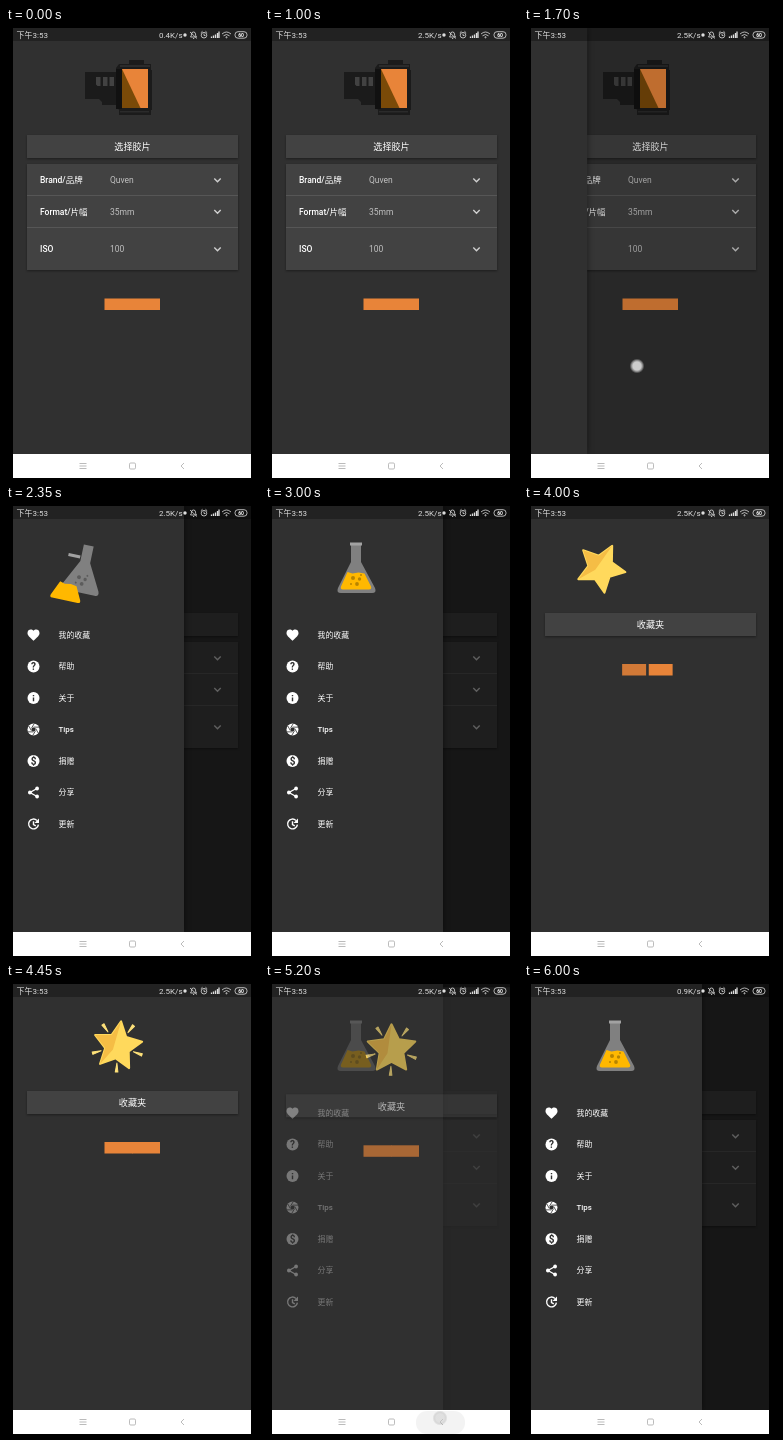
An HTML page for the animation above (6050 ms loop, 253 by 450 pixels).

```html
<!DOCTYPE html>
<html lang="zh">
<head>
<meta charset="utf-8">
<style>
html, body { margin: 0; height: 100%; overflow: hidden; background: #000; }
svg { display: block; width: 253px; height: 450px; }
text { font: 8.5px Roboto, "Noto Sans CJK SC", "Noto Sans CJK", sans-serif; fill: #fff; }
.title { font-size: 9.1px; text-anchor: middle; }
.label { font-weight: 500; }
.value { fill: #c1c1c1; }
.item { font-size: 7.9px; font-weight: 500; }
.status { font-size: 8px; fill: #ddd; }
.sign { font-size: 10px; font-weight: 700; text-anchor: middle; fill: #303030; }
.line { fill: none; stroke: #fff; stroke-width: 1.4; }
.thin { fill: none; stroke: #ddd; stroke-width: .8; }
.nav { fill: none; stroke: #aaa; stroke-width: .8; }
.card { fill: #424242; filter: drop-shadow(0 1px 1px #0006); }
#drawer { filter: drop-shadow(0 0 3px #0008); }
</style>
</head>
<body>
<svg viewBox="0 0 253 450">
  <defs>
    <clipPath id="itemClip"><path d="M11 113h163v32H11z"/></clipPath>
    <radialGradient id="dot">
      <stop offset=".55" stop-color="#ccc"/><stop offset=".75" stop-color="#aaa" stop-opacity=".75"/>
      <stop offset="1" stop-color="#888" stop-opacity="0"/>
    </radialGradient>
  </defs>

  <g id="home">
    <path fill="#303030" d="M7 0h238v426H7z"/>
    <g id="camera">
      <path fill="#1b1b1b" d="M79 44h31v-4l3-4h10v-4h15v4h7v6h1v40h-1v5h-32v-5l-3-5h-14v-3l-3-3H79z"/>
      <path fill="#111" d="M110 41h6v40h-6z"/>
      <path fill="#424242" d="M90 49h4.5v9H91.500l-1.500-1.500zM97 49h4.500v9H97zM103.500 49h4.500v9h-4.500z"/>
      <path fill="#e88439" d="M116 41h26v39h-26z"/>
      <path fill="#7a4a08" d="M116 41l18.500 39H116z"/>
      <path fill="#2b2b2b" d="M114 37h30v2h-30zM114 83h29v1.500h-29z"/>
    </g>
    <path class="card" d="M21 107h211v23H21z"/>
    <text class="title" x="126.500" y="122.300">选择胶片</text>
    <path class="card" d="M21 136h211v106H21z"/>
    <path stroke="#5c5c5c" stroke-width=".8" d="M21 167.500h211M21 199.500h211"/>
    <g id="rows"></g>
    <path fill="#e88439" d="M98.500 270.500h55.500v11.500H98.500z"/>
  </g>

  <path id="scrim" d="M7 0h238v426H7z"/>

  <g id="drawer">
    <path fill="#303030" d="M7 0h171v426H7z"/>
    <g id="flask">
      <path fill="#808080" d="M86 39h10v17l14 26q2 5-3 5H76q-5 0-3-5l13-26z"/>
      <g id="liquid">
        <path fill="#ffb800" d="M82.500 66l5 1.500 6-1 6 1 6.500 13q1 3-2 3H78q-3 0-2-3z"/>
      </g>
      <g fill="#000" opacity=".28">
        <circle cx="88" cy="72" r="2"/><circle cx="94.500" cy="73" r="1.700"/>
        <circle cx="92" cy="78" r="1.900"/><circle cx="86" cy="78" r="1"/><circle cx="96" cy="69" r="1"/>
      </g>
      <path id="rim" fill="#a2a2a2" d="M85 36.500h12v3H85z"/>
    </g>
    <g clip-path="url(#itemClip)"><circle id="ripple" cx="121" cy="131" fill="#fff"/></g>
    <g id="items"></g>
  </g>

  <g id="favorites">
    <path fill="#303030" d="M7 0h238v440H7z"/>
    <path class="card" d="M21 107h211v23H21z"/>
    <text class="title" x="126.500" y="122.300">收藏夹</text>
    <path id="barA" fill="#e88439"/>
    <path id="barB" fill="#e88439"/>
    <g id="star"><g id="rays"></g><g id="body"></g></g>
  </g>

  <path fill="#000" opacity=".3" d="M7 0h238v13H7z"/>
  <text class="status" x="10.500" y="10">下午3:53</text>
  <text class="status" id="speed" x="153" y="10"></text>
  <circle cx="179" cy="7" r="1.700" fill="#ddd"/>
  <g class="thin">
    <path d="M184.500 9h6q-1-1-1-3t-2-2-2 2-1 3M187 10.500h1.200M184 4l7 6.500"/>
    <circle cx="198" cy="7.200" r="2.800"/><path d="M198 5.500v2h1.500M194.800 4.800l1.700-1.500M201.200 4.800l-1.700-1.500"/>
    <path d="M205.500 10v-1.500M207.500 10v-2.500M209.500 10V6.500M211.500 10V5M213 10V3.500" stroke-width="1.300"/>
    <path d="M216 6q4.500-4 9 0M217.500 7.800q3-2.600 6 0"/><circle cx="220.500" cy="9.300" r=".6"/>
    <rect x="229" y="3.700" width="12" height="6.500" rx="3"/>
  </g>
  <text x="235" y="8.800" style="font-size:5px;font-weight:700;text-anchor:middle">60</text>

  <path fill="#fff" d="M7 426h238v24H7z"/>
  <rect id="navRipple" x="151" y="427" width="49" height="23" rx="11" fill="#ddd"/>
  <path class="nav" d="M73.500 435.500h7M73.500 438h7M73.500 440.500h7M178 435l-3 3 3 3"/>
  <rect class="nav" x="123.500" y="435" width="6" height="6" rx="1.200"/>
  <circle id="touch" r="7.500" fill="url(#dot)"/>
  <path fill="#000" d="M0 0h7v450H0zM245 0h8v450h-8z"/>
</svg>
<script>
const LOOP = 6050, STEP = 50;
const el = id => document.getElementById(id);
const set = (id, attrs) => { for (const k in attrs) el(id).setAttribute(k, attrs[k]); };
const ramp = (t, from, to) => Math.min(1, Math.max(0, (t - from) / (to - from)));
const mix = (a, b, p) => a + (b - a) * p;
const polar = (deg, r) => {
  const a = deg * Math.PI / 180;
  return [r * Math.sin(a), -r * Math.cos(a)].map(v => v.toFixed(2)).join(' ');
};

// Cubic Bezier (.4, 0, .2, 1)
function fastOutSlowIn(x) {
  let lo = 0, hi = 1;
  for (let i = 0; i < 16; i++) {
    const s = (lo + hi) / 2, r = 1 - s;
    if (1.2 * r * r * s + .6 * r * s * s + s * s * s < x) lo = s; else hi = s;
  }
  return 3 * (1 - lo) * lo * lo + lo ** 3;
}

el('rows').innerHTML = [
  ['Brand/品牌', 'Quven', 152], ['Format/片幅', '35mm', 183.5], ['ISO', '100', 221]
].map(([label, value, y]) => `
  <text class="label" x="34" y="${y + 3}">${label}</text>
  <text class="value" x="104" y="${y + 3}">${value}</text>
  <path class="line" opacity=".75" d="M208.300 ${y - 1.5}l3.200 3.200 3.200-3.200"/>`).join('');

// Icons are centred on 0,0
const disc = '<circle r="6" fill="#fff"/>';
const sign = c => `${disc}<text class="sign" y="3.600">${c}</text>`;
const blades = [0, 60, 120, 180, 240, 300].map(a =>
  `M${polar(a, 2.4)}L${polar(a + 68, 6.2)}`).join('');
const icons = [
  ['我的收藏', '<path fill="#fff" d="M0 5.700C-4 2-6 .4-6-2.100-6-5.800-1.800-6.500 0-4.200 1.800-6.500 6-5.800 6-2.100 6 .4 4 2 0 5.700z"/>'],
  ['帮助', sign('?')],
  ['关于', disc + '<path fill="#303030" d="M-.7-3h1.400v1.300H-.7zM-.7-.6h1.400v3.800H-.7z"/>'],
  ['Tips', `${disc}<circle r="2" fill="#303030"/><path stroke="#303030" stroke-width=".8" d="${blades}"/>`],
  ['捐赠', sign('$')],
  ['分享', '<path class="line" stroke-width="1.200" d="M3.600-4L-3.600 0 3.600 4"/><g fill="#fff"><circle cx="3.600" cy="-4" r="1.900"/><circle cx="-3.600" r="1.900"/><circle cx="3.600" cy="4" r="1.900"/></g>'],
  ['更新', '<path class="line" d="M3.400-3.600A4.900 4.900 0 1 0 4.900.6M0-2.800V.5L2.300 1.900"/><path fill="#fff" d="M5.500-5.500v4.500H1z"/>']
];
el('items').innerHTML = icons.map(([name, icon], i) => {
  const y = 129 + 31.5 * i;
  return `<g transform="translate(27.500 ${y})">${icon}</g><text class="item" x="52.500" y="${y + 2.9}">${name}</text>`;
}).join('');

const spikes = [0, 1, 2, 3, 4].map(i => i * 72);
el('body').innerHTML =
  `<path fill="#ffd95c" stroke="#ffd95c" stroke-width="2" stroke-linejoin="round" d="M${
    spikes.map(a => `${polar(a, 25)}L${polar(a + 36, 12.5)}`).join('L')}z"/>` +
  `<path fill="#f5bd45" d="M${[[0, 25], [-36, 12.5], [-72, 25], [-108, 12.5], [-144, 25]]
    .map(p => polar(...p)).join('L')}L-4 4z"/>`;
el('rays').innerHTML = spikes.map(a =>
  `<path fill="#ffe27a" stroke="#ffe27a" stroke-linejoin="round" d="M0-17l-1.300-9h2.600z" transform="rotate(${a + 38})"/>`).join('');

function touchAt(t) {
  if (t >= 1500 && t < 1900) return [13 + (t - 1500) / 2, 338, 1 - ramp(t, 1800, 1900)];
  if (t >= 3450 && t < 3800) return [121.500, 131, t < 3650 ? 1 : .35];
  if (t >= 4900 && t < 5300) return [175, 434, .5];
  return [0, 0, 0];
}

function draw(t) {
  const open = ramp(t, 1600, 1905);
  set('scrim', { opacity: .54 * open });
  set('drawer', {
    transform: `translate(${171 * (open - 1)} 0)`,
    visibility: open ? 'visible' : 'hidden'
  });

  // Flask swings in while its loose parts catch up
  const lag = (1 - ramp(t, 1650, 2650)) / .3;
  const trail = `translate(${-12 * lag} ${14 * lag})`;
  set('flask', { transform: `translate(${-13 * lag} 0) rotate(${12 * lag} 91 62)` });
  set('liquid', { transform: trail });
  set('rim', { transform: trail });
  set('ripple', {
    r: 64 * ramp(t, 3500, 3700),
    opacity: .08 * (1 - ramp(t, 3750, 3950))
  });

  const shown = t < 5000 ? ramp(t, 3580, 3880) : 1 - ramp(t, 5134, 5434);
  set('favorites', {
    opacity: shown ** 1.7,
    transform: `translate(0 ${108 * (1 - fastOutSlowIn(shown))})`,
    visibility: shown ? 'visible' : 'hidden'
  });
  const left = 73 * (1 - ramp(t, 3700, 4644));
  set('star', { transform: `translate(${126.5 - left} 62)` });
  set('body', { transform: `rotate(${left * .55})` });
  set('rays', { transform: `scale(${ramp(t, 4150, 4400)})` });
  const grow = ramp(t, 3700, 4100);
  const bar = (x, w) => ({ d: `M${x} 158h${w}v11.500h${-w}z` });
  set('barA', { ...bar(mix(97, 98.5, grow), mix(12, 28, grow)), opacity: mix(.5, 1, grow) });
  set('barB', bar(mix(121, 126, grow), mix(11.500, 28, grow)));

  const [x, y, alpha] = touchAt(t);
  set('touch', { cx: x, cy: y, opacity: alpha });
  set('navRipple', { opacity: .35 * ramp(t, 4950, 5150) * (1 - ramp(t, 5300, 5550)) });
  el('speed').textContent = (t < 450 ? '0.4' : t < 5650 ? '2.5' : '0.9') + 'K/s';
}

function tick() {
  const t = performance.now() % LOOP;
  draw(Math.floor(t / STEP) * STEP);
  requestAnimationFrame(tick);
}
tick();
</script>
</body>
</html>
```
